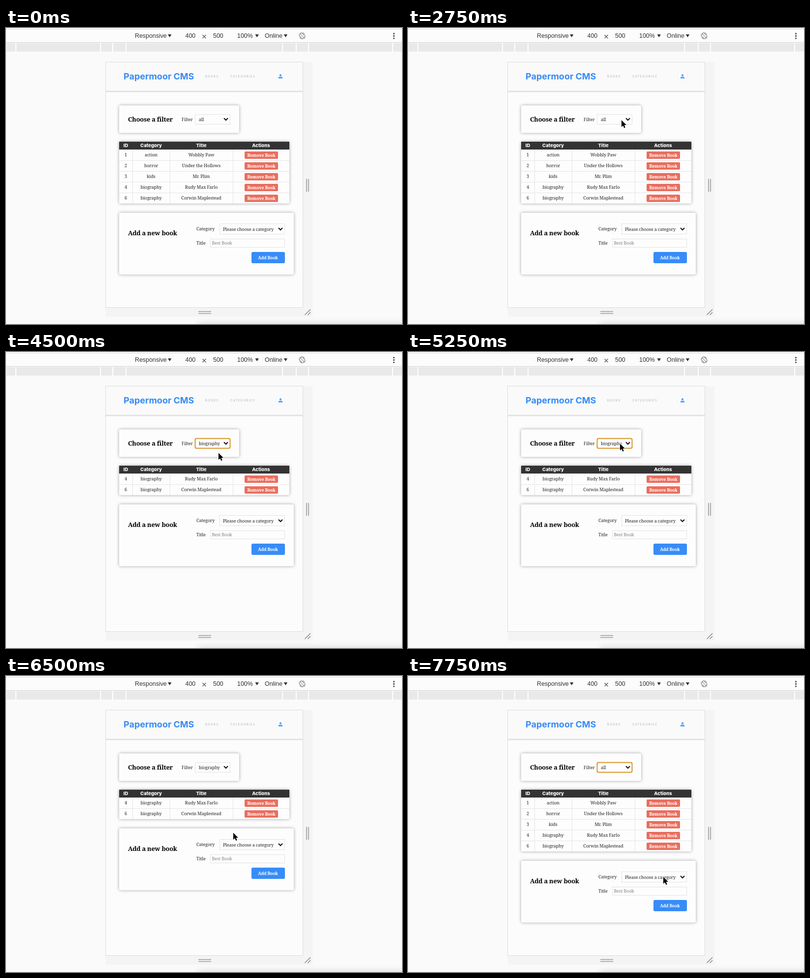
These frames come from a looping animation (805 px wide and 604 px high, 8 s). An HTML page:

```html
<!DOCTYPE html>
<html lang="en">
<head>
<meta charset="utf-8">
<title>Book list</title>
<style>
html, body { margin: 0; width: 100%; height: 100%; overflow: hidden; background: #fafafa; }
svg { display: block; width: 805px; height: 604px; }
text { white-space: pre; }
.ui { font: 12.4px "Liberation Sans", Arial, sans-serif; fill: #333; }
.logo { font: 700 18px Inter, sans-serif; fill: #378bf7; }
.nav { font: 5.8px Inter, sans-serif; letter-spacing: 1.5px; fill: #b0b0b0; }
.body { font: 9px "Noto Serif", serif; letter-spacing: -.1px; fill: #222; }
.hint { fill: #808080; }
.h { font: 700 12.8px "Noto Serif", serif; letter-spacing: -.2px; fill: #000; }
.btn { font: 700 8.6px "Noto Serif", serif; letter-spacing: -.15px; fill: #fff; }
.th { font: 800 9.5px Inter, sans-serif; fill: #fff; }
.item { font: 9px Inter, sans-serif; fill: #222; }
.mid { text-anchor: middle; }
.card { filter: drop-shadow(0 0 3px rgba(0, 0, 0, .35)); }
.menu { filter: drop-shadow(0 4px 6px rgba(0, 0, 0, .3)); }
.shade { filter: blur(7px); }
</style>
</head>
<body>
<svg id="stage" viewBox="0 0 805 604"></svg>
<script>
const stage = document.getElementById('stage');
const LOOP = 8000;
const books = [
  [1, 'action', 'Wobbly Paw'],
  [2, 'horror', 'Under the Hollows'],
  [3, 'kids', 'Mr. Plim'],
  [4, 'biography', 'Rudy Max Farlo'],
  [6, 'biography', 'Corwin Maplestead']
];
const options = ['all', 'action', 'biography', 'history', 'horror', 'kids', 'learning', 'sci-fi'];
const columns = [243.5, 295, 397, 518.5];

// time, pointer x, pointer y, state changes
const steps = [
  [0, -50, 0, { filter: 'all', open: false, hover: 0, focus: false, badge: false }],
  [750, 556, 90, { badge: true }],
  [1000, 500, 100],
  [1250, 440, 108],
  [1500, 360, 128],
  [1750, 275, 119],
  [2000, 451, 209],
  [2250, 445, 201],
  [2500, 439, 193],
  [2750, 434, 188],
  [3500, 434, 188, { open: true }],
  [3750, 434, 195, { hover: 1 }],
  [4250, 432, 206, { hover: 2 }],
  [4500, 432, 206, { open: false, filter: 'biography', focus: true }],
  [4750, 432, 200],
  [5000, 431, 193],
  [5250, 431, 187],
  [5500, 431, 187, { open: true }],
  [5750, 440, 189],
  [6000, 531, 205, { open: false, focus: false }],
  [6250, 505, 255],
  [6500, 462, 320],
  [6750, 440, 188, { open: true }],
  [7000, 434, 156, { hover: 0 }],
  [7250, 458, 385, { open: false, filter: 'all', focus: true }],
  [7500, 490, 398],
  [7750, 519, 410, { badge: false }]
];

const text = (x, y, s, cls) => `<text x="${x}" y="${y}" class="${cls}">${s}</text>`;
const rect = (x, y, w, h, fill, more = '') =>
  `<rect x="${x}" y="${y}" width="${w}" height="${h}" fill="${fill}" ${more}/>`;
const line = (d, color, width = 1) =>
  `<path d="${d}" fill="none" stroke="${color}" stroke-width="${width}"/>`;
const arrow = (x, y) => `<path d="M${x} ${y}h7.4l-3.7 6z" fill="#333"/>`;
const card = (x, y, w, h) => rect(x, y, w, h, '#fdfdfd', 'rx="3" class="card"');
const field = (x, y, w, h) => rect(x, y, w, h, '#fdfdfd', 'stroke="#e2e2e2"');
const chevron = (x, y) => line(`M${x - 4} ${y - 2}l4 4 4-4`, '#111', 2);

function toolbar() {
  const gaps = [0, 20, 192, 217, 244, 562, 590, 615, 786];
  return rect(0, 0, 805, 30, '#fcfcfc') + line('M0 2.5H805', '#dedede') +
    line('M0 29.5H805', '#cfcfcf') + rect(0, 31, 805, 17, '#e9e9e9') +
    gaps.map(x => rect(x - 1, 31, 2, 17, '#fff')).join('') +
    text(262, 20, 'Responsive', 'ui') + arrow(329, 13) +
    text(364.5, 20, '400', 'ui') + line('M399.5 14l7 7m0-7l-7 7', '#555', 1.2) +
    text(421, 20, '500', 'ui') + text(470, 20, '100%', 'ui') + arrow(506.5, 13) +
    text(526, 20, 'Online', 'ui') + arrow(564.7, 13) +
    '<rect x="598" y="10.5" width="8" height="11" rx="1.5" transform="rotate(-45 602 16)" fill="none" stroke="#666"/>' +
    line('M597 10.5L607.5 21.5M597 18.5q1 3 4 4M603 9.5q3 1 4 4', '#666') +
    [11.5, 16.3, 21.1].map(y => `<circle cx="788.5" cy="${y}" r="1.7" fill="#555"/>`).join('');
}

function device(badge) {
  return rect(390, 602, 450, 30, '#000', 'opacity=".12" class="shade"') +
    rect(203, 70, 420, 519, '#f4f4f4') +
    rect(202.5, 69.5, 401, 501, '#fcfcfc', 'stroke="#dcdcdc"') +
    line('M611 308V334M615 308V334M391 578.5H417M391 582.5H417', '#999', 1.6) +
    line('M607.5 585.5L619 574M613.5 585.5L619 580', '#888', 1.5) +
    rect(203, 70, 400, 58, '#fafafa') + rect(203, 128, 400, 3, '#e3e3e3') +
    text(239, 105, 'Papermoor CMS', 'logo') +
    text(405, 101, 'BOOKS', 'nav') + text(456, 101, 'CATEGORIES', 'nav') +
    (badge ? '<circle cx="558" cy="99" r="9.5" fill="#fff" stroke="#f0f0f0"/>' : '') +
    '<g fill="#5aa2f5"><circle cx="558" cy="96.4" r="2.2"/><path d="M553.7 103v-1.2q0-2.4 2.4-2.4h3.8q2.4 0 2.4 2.4v1.2z"/></g>';
}

function filterCard({ filter, focus }) {
  return card(230, 158, 244, 56) + text(248, 191, 'Choose a filter', 'h') +
    text(357, 190, 'Filter', 'body') + field(384.5, 176.5, 71, 20) +
    (focus ? rect(384.5, 176.5, 71, 20, 'none', 'rx="3" stroke="#d9932a" stroke-width="2"') : '') +
    text(392, 190, filter, 'body') + chevron(447, 186);
}

function table(rows) {
  const bottom = 248 + rows.length * 22;
  const cells = rows.map((row, i) => {
    const y = 248 + i * 22;
    return (i ? line(`M230 ${y + .5}H576`, '#e4e4e4') : '') +
      row.map((s, c) => text(columns[c], y + 14, s, 'body mid')).join('') +
      rect(485, y + 4, 68, 15, '#e96e5e', 'rx="2"') +
      text(519, y + 15, 'Remove Book', 'btn mid');
  });
  return card(230, 232, 346, bottom - 232) + rect(230, 232, 346, 16, '#333') +
    ['ID', 'Category', 'Title', 'Actions'].map((s, c) => text(columns[c], 243, s, 'th mid')).join('') +
    line([257.5, 333.5, 461.5].map(x => `M${x} 248V${bottom}`).join(''), '#e4e4e4') +
    cells.join('');
}

function form(shift) {
  return `<g transform="translate(0 ${shift})">` + card(230, 377, 355, 126) +
    text(248, 423, 'Add a new book', 'h') +
    text(387, 413, 'Category', 'body') + field(434.5, 399.5, 132, 21) +
    text(441, 414, 'Please choose a category', 'body') + chevron(558, 410) +
    text(387, 442, 'Title', 'body') + field(415.5, 430.5, 151, 17) +
    text(418.5, 442, 'Best Book', 'body hint') +
    rect(499, 457, 68, 23, '#378cf8', 'rx="3"') +
    text(532.5, 472, 'Add Book', 'btn mid') + '</g>';
}

function menu({ filter, hover }) {
  const checked = options.indexOf(filter);
  const top = 172 - checked * 13;
  return rect(374, top, 86, 112, '#ececec', 'rx="4" stroke="#c4c4c4" stroke-width=".7" class="menu"') +
    rect(374, top + 4 + hover * 13, 86, 13, '#4f8ef3') +
    line(`M380.5 ${top + 11.5 + checked * 13}l2.5 3.2 5-7.4`, checked === hover ? '#fff' : '#222', 1.4) +
    options.map((s, i) =>
      `<text x="395" y="${top + 14 + i * 13}" class="item"${i === hover ? ' style="fill:#fff"' : ''}>${s}</text>`).join('');
}

const pointer = (x, y) =>
  `<path transform="translate(${x} ${y})" d="M0 0V14l3.2-3 2.2 5 2.3-1-2.1-4.9H10z" fill="#000" stroke="#fff" stroke-width="1.4" paint-order="stroke"/>`;

function scene(n) {
  const state = Object.assign({}, ...steps.slice(0, n + 1).map(s => s[3]));
  const rows = books.filter(b => state.filter === 'all' || b[1] === state.filter);
  return toolbar() + device(state.badge) + filterCard(state) + table(rows) +
    form((rows.length - books.length) * 22) + (state.open ? menu(state) : '') +
    pointer(steps[n][1], steps[n][2]);
}

let shown = -1;
function tick() {
  const t = performance.now() % LOOP;
  const n = steps.filter(s => s[0] <= t).length - 1;
  if (n !== shown) stage.innerHTML = scene(shown = n);
  requestAnimationFrame(tick);
}
tick();
</script>
</body>
</html>
```
